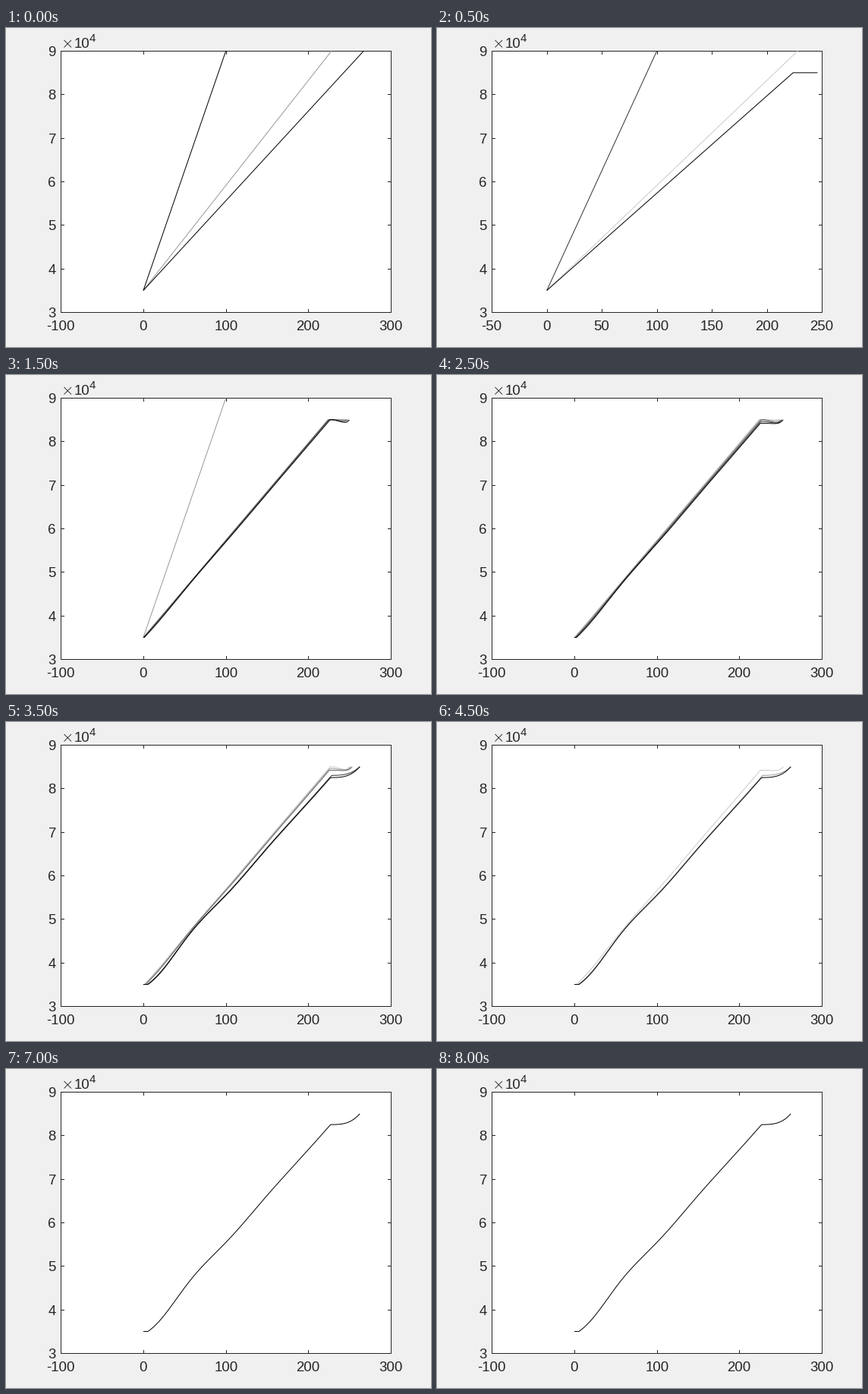
These frames come from a looping animation (560x420 px, 8500 ms). A matplotlib script:

```python
import numpy as np
import matplotlib.pyplot as plt
from matplotlib.animation import FuncAnimation
from matplotlib.patches import Rectangle

W, H, DPI = 560, 420, 100
PT = 72 / DPI
LEFT, RIGHT, TOP, BOTTOM = 72.5, 507.5, 30.5, 374.5
INK = "#262626"
FRAMES, STEP = 17, 500
TRAIL = 5
GROUND, GOAL = 3.5, 8.5  # heights in units of 1e4


def ray(reach):
    """Straight line from the start that leaves the plot at x = reach."""
    return np.array([0, reach]), np.array([GROUND, 9])


def flight(start, slope, wave, end, depth, lead, knee, power):
    """A climb with a damped wave, capped by a dip that returns to the goal."""
    x = np.linspace(0, end, 400)
    climb = start + slope * x - wave * np.exp(-x / 60) * np.sin(2 * np.pi * x / 94)
    u = np.clip((x - knee) / (end - knee), 0, 1)
    cap = GOAL - depth * (1 - u ** power) * (lead + (1 - lead) * u)
    return x, np.maximum(GROUND, np.minimum(climb, cap))


def early(s):
    """Early trajectories, s from 0 to 1: later, wavier and with a deeper dip."""
    return flight(GROUND - 0.05 * s, 0.02235 - 0.0003 * s, 0.06 * s, 246 + 7 * s,
                  0.1 * min(1, 2 * s), 0.8 * max(0, 2 * s - 1), 230, 6)


# One trajectory joins the trail per step; the last one stays for good.
PATHS = [ray(100)] + [early(s) for s in np.linspace(0, 1, 5)]
PATHS.append(flight(3.44, 0.0213, 0.14, 262.3, 0.2, 1, 224.5, 3.3))
PATHS.append(flight(3.43, 0.02125, 0.15, 262.3, 0.25, 1, 224.5, 3.3))
LAST = len(PATHS) - 1


def to_px(x, y, x0, x1):
    return (LEFT + (x - x0) / (x1 - x0) * (RIGHT - LEFT),
            BOTTOM - (y - 3) / 6 * (BOTTOM - TOP))


fig = plt.figure(figsize=(W / DPI, H / DPI), dpi=DPI, facecolor="#f0f0f0")
ax = fig.add_axes([0, 0, 1, 1])


def stroke(x, y, color=INK, width=1.0, z=2):
    ax.plot(x, y, color=color, lw=width * PT, zorder=z, snap=False,
            solid_capstyle="butt", solid_joinstyle="round")


def label(x, y, text, ha="center", size=18.67):
    ax.text(x, y, text, ha=ha, va="baseline", fontsize=size * PT,
            family="Liberation Sans", color=INK)


def draw_axes(x0, x1, gap):
    ax.add_patch(Rectangle((LEFT, TOP), RIGHT - LEFT, BOTTOM - TOP,
                           fc="white", ec="none", zorder=0, snap=False))
    ax.add_patch(Rectangle((LEFT, TOP), RIGHT - LEFT, BOTTOM - TOP, fill=False,
                           ec=INK, lw=PT, zorder=2, snap=False))
    for value in range(x0, x1 + 1, gap):
        x = np.floor(to_px(value, 3, x0, x1)[0]) + 0.5
        stroke([x, x], [BOTTOM, BOTTOM - 4.5])
        stroke([x, x], [TOP, TOP + 4.5])
        label(x - 0.5, 398, str(value))
    for value in range(3, 10):
        y = np.floor(to_px(0, value, x0, x1)[1]) + 0.5
        stroke([LEFT, LEFT + 4.5], [y, y])
        stroke([RIGHT, RIGHT - 4.5], [y, y])
        label(66, y + 6.5, str(value), "right")
    stroke([76.5, 86], [16, 25.5], width=0.9)
    stroke([76.5, 86], [25.5, 16], width=0.9)
    label(90, 26, "10", "left")
    label(110, 18, "4", "left", 14.9)


def draw(i):
    ax.clear()
    ax.set_xlim(0, W)
    ax.set_ylim(H, 0)
    ax.axis("off")
    x0, x1, gap = (-50, 250, 50) if i in (1, 2) else (-100, 300, 100)
    draw_axes(x0, x1, gap)

    def curve(path, shade):
        x, y = to_px(*path, x0, x1)
        stroke(x - 0.3, y - 0.3, str(shade), z=3)

    if i < 2:
        curve(ray(228), (3 + i) / TRAIL)
    if i == 0:
        curve(ray(267), 0)
    newest = min(i, LAST)
    for k in range(max(0, i - TRAIL + 1), newest):
        curve(PATHS[k], (i - k) / TRAIL)
    curve(PATHS[newest], 0)
    return []


anim = FuncAnimation(fig, draw, frames=FRAMES, interval=STEP,
                     init_func=lambda: [], repeat=True, repeat_delay=0)
plt.show()
```
